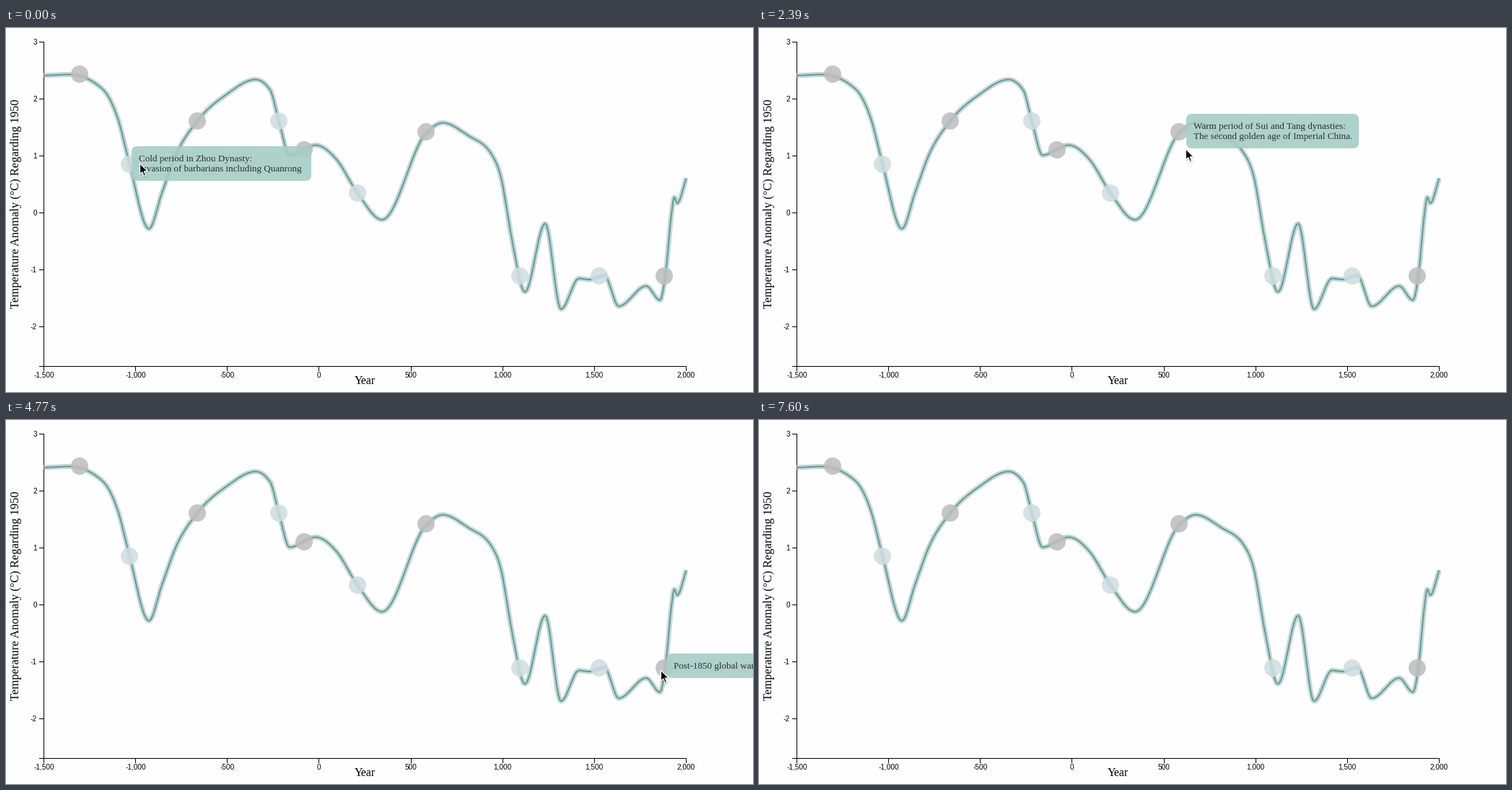
Recreate the animation shown at these times as a matplotlib script. Size 1035 by 505 pixels, loop 8.08 s.

```python
import matplotlib.pyplot as plt
import numpy as np
from matplotlib.animation import FuncAnimation
from matplotlib.patches import Circle, FancyBboxPatch, Polygon

W, H, DPI = 1035, 505, 100
LOOP, INTERVAL = 8080, 20
PX = 72 / DPI  # points per pixel

LEFT, RIGHT, TOP, BOTTOM = 52.5, 942.5, 19.5, 469.5
SERIF, SANS = "Liberation Serif", "Liberation Sans"
FADE_IN, FADE_OUT = 150, 500

# Turning points of the curve, plus a few points on its uneven slopes.
CURVE = [
    (52.5, 66), (88, 64.5), (133, 84), (156, 129), (171, 188), (198, 278.5),
    (216, 229), (235, 177), (265, 129), (305, 92.5), (346, 71.5), (366, 86),
    (378, 129), (393, 176.5), (429, 162.5), (458, 182.5), (487, 229),
    (521, 266), (582, 146), (605, 131.5), (640, 149), (672, 174),
    (686, 208), (700, 288), (719, 366), (747, 271.5), (769, 390),
    (794, 347.5), (808, 349), (829, 343.5), (849, 386), (887, 358),
    (906, 377.5), (914, 340), (922, 258), (926, 235), (930, 243),
    (942.5, 208.5),
]
WARM = [(102, 64), (265, 129), (413, 169), (582, 144), (912, 344)]
COLD = [(171, 189), (378, 129), (487, 229), (712, 344), (822, 344)]

# Pointer way points: ms, x, y
POINTER = np.array([
    (0, 185.5, 188), (600, 400, 312), (1190, 588.5, 145.5),
    (2250, 588.5, 145.5), (2830, 637.5, 337.5), (3270, 924, 398),
    (3570, 908.5, 348), (5060, 907, 347), (5360, 850, 321),
    (5660, 809.5, 337.5), (5960, 816, 341), (7010, 816, 341),
    (7160, 850.5, 384.5), (7600, 878, 520),
])

# The picture moves in bursts of about 150 ms steps: first, last, count.
BURSTS = [(0, 0, 1), (150, 1190, 8), (2390, 3570, 9), (4770, 4770, 1),
          (5060, 5960, 7), (7160, 7600, 4)]
STEPS = np.round(np.concatenate([np.linspace(*b) for b in BURSTS]), -1)

# left, top, width, enter ms, leave ms, text
TIPS = [
    (174, 164, 249, -500, 0, "Cold period in Zhou Dynasty:\n"
     "Invasion of barbarians including Quanrong"),
    (592, 119, 239, 980, 2500, "Warm period of Sui and Tang dynasties:\n"
     "The second golden age of Imperial China."),
    (915, 324, 160, 3420, 5040, "Post-1850 global warming"),
    (812, 308, 270, 5770, 7150,
     "The Little Ice Age of Ming and Qing dynasties:\n"
     "Mongols and Manchus put pressure on Ming\ndynasty."),
]

ARROW = np.array([(0, 0), (0, 14.8), (3.3, 11.7), (5.8, 17.4),
                  (8.2, 16.4), (5.8, 10.8), (10.6, 10.6)])


def monotone(x, y, q):
    """Monotone cubic through (x, y), evaluated at q."""
    h = np.diff(x)
    s = np.diff(y) / h
    p = (s[:-1] * h[1:] + s[1:] * h[:-1]) / (h[:-1] + h[1:])
    least = np.minimum(np.minimum(abs(s[:-1]), abs(s[1:])), abs(p) / 2)
    inner = (np.sign(s[:-1]) + np.sign(s[1:])) * least
    m = np.concatenate([s[:1], inner, s[-1:]])
    i = np.clip(np.searchsorted(x, q, "right") - 1, 0, len(h) - 1)
    u = (q - x[i]) / h[i]
    return ((1 + 2 * u) * (1 - u) ** 2 * y[i] + u * (1 - u) ** 2 * h[i] * m[i]
            + u ** 2 * (3 - 2 * u) * y[i + 1]
            + u ** 2 * (u - 1) * h[i] * m[i + 1])


def ease(u):
    """Cubic in and out, clamped to 0..1."""
    u = min(max(u, 0), 1)
    return 4 * u ** 3 if u < 0.5 else 1 - 4 * (1 - u) ** 3


def label(x, y, text, px, font=SERIF, ha="left", **kw):
    return ax.text(x, y, text, fontsize=px * PX, family=font, ha=ha,
                   va="baseline", **kw)


def rule(x, y):
    ax.plot(x, y, color="black", lw=PX, solid_capstyle="projecting",
            snap=False)


fig = plt.figure(figsize=(W / DPI, H / DPI), dpi=DPI, facecolor="#fefefe")
ax = fig.add_axes([0, 0, 1, 1])
ax.set_xlim(0, W)
ax.set_ylim(H, 0)
ax.axis("off")


def draw_axes():
    rule([LEFT, LEFT], [TOP, BOTTOM])
    rule([LEFT - 6, RIGHT], [BOTTOM, BOTTOM])
    for v in range(-2, 4):
        y = TOP + 79 * (3 - v)
        rule([LEFT - 6, LEFT], [y, y])
        label(43, y + 3.5, str(v), 10, SANS, "right")
    for year in range(-1500, 2001, 500):
        x = LEFT + (RIGHT - LEFT) * (year + 1500) / 3500
        tick = np.floor(x) + 0.5
        rule([tick, tick], [BOTTOM, BOTTOM + 6])
        label(x, 485, f"{year:,}", 10, SANS, "center")
    label(497, 494, "Year", 16, ha="center")
    label(18, 244, "Temperature Anomaly (°C) Regarding 1950", 16.5,
          ha="center", rotation=90, rotation_mode="anchor")


def draw_curve():
    x, y = np.array(CURVE).T
    q = np.linspace(LEFT, RIGHT, 1400)
    line = monotone(x, y, q)
    for color, width in (("#c4d7d8", 7), ("#639a96", 2)):
        ax.plot(q, line, color=color, lw=width * PX, zorder=3,
                solid_capstyle="butt", solid_joinstyle="round")
    for spots, color in ((WARM, "#bfbebe"), (COLD, "#cfdde1")):
        for spot in spots:
            ax.add_patch(Circle(spot, 12, fc=color, ec="none", alpha=0.87,
                                zorder=4))


def make_tip(left, top, width, text):
    lines = text.split("\n")
    box = FancyBboxPatch(
        (left, top), width, 20 + 14 * len(lines), fc="#a6cec6", ec="none",
        boxstyle="round,pad=0,rounding_size=8", zorder=5)
    ax.add_patch(box)
    return [box] + [label(left + 10, top + 21 + 14 * k, s, 13.15,
                          color="#222222", zorder=6, clip_on=True)
                    for k, s in enumerate(lines)]


draw_axes()
draw_curve()
tips = [make_tip(*tip[:3], tip[5]) for tip in TIPS]
shadow = Polygon(ARROW, fc="black", ec="black", lw=2 * PX, alpha=0.12,
                 zorder=7)
arrow = Polygon(ARROW, fc="black", ec="white", lw=1.2 * PX, zorder=8)
ax.add_patch(shadow)
ax.add_patch(arrow)


def update(i):
    now = (i + 0.5) * INTERVAL
    t = STEPS[np.searchsorted(STEPS, now, "right") - 1]
    for parts, (_, _, _, enter, leave, _) in zip(tips, TIPS):
        shown = ease((t - enter) / FADE_IN) - ease((t - leave) / FADE_OUT)
        for part in parts:
            part.set_visible(shown > 0.01)
            part.set_alpha(0.9 * max(shown, 0))
    ms, x, y = POINTER.T
    tip = np.array([monotone(ms, x, t), monotone(ms, y, t)])
    arrow.set_xy(ARROW + tip)
    shadow.set_xy(ARROW + tip + (0.5, 1.2))
    return [arrow, shadow]


anim = FuncAnimation(fig, update, frames=LOOP // INTERVAL, interval=INTERVAL,
                     repeat=True, cache_frame_data=False)
plt.show()
```
